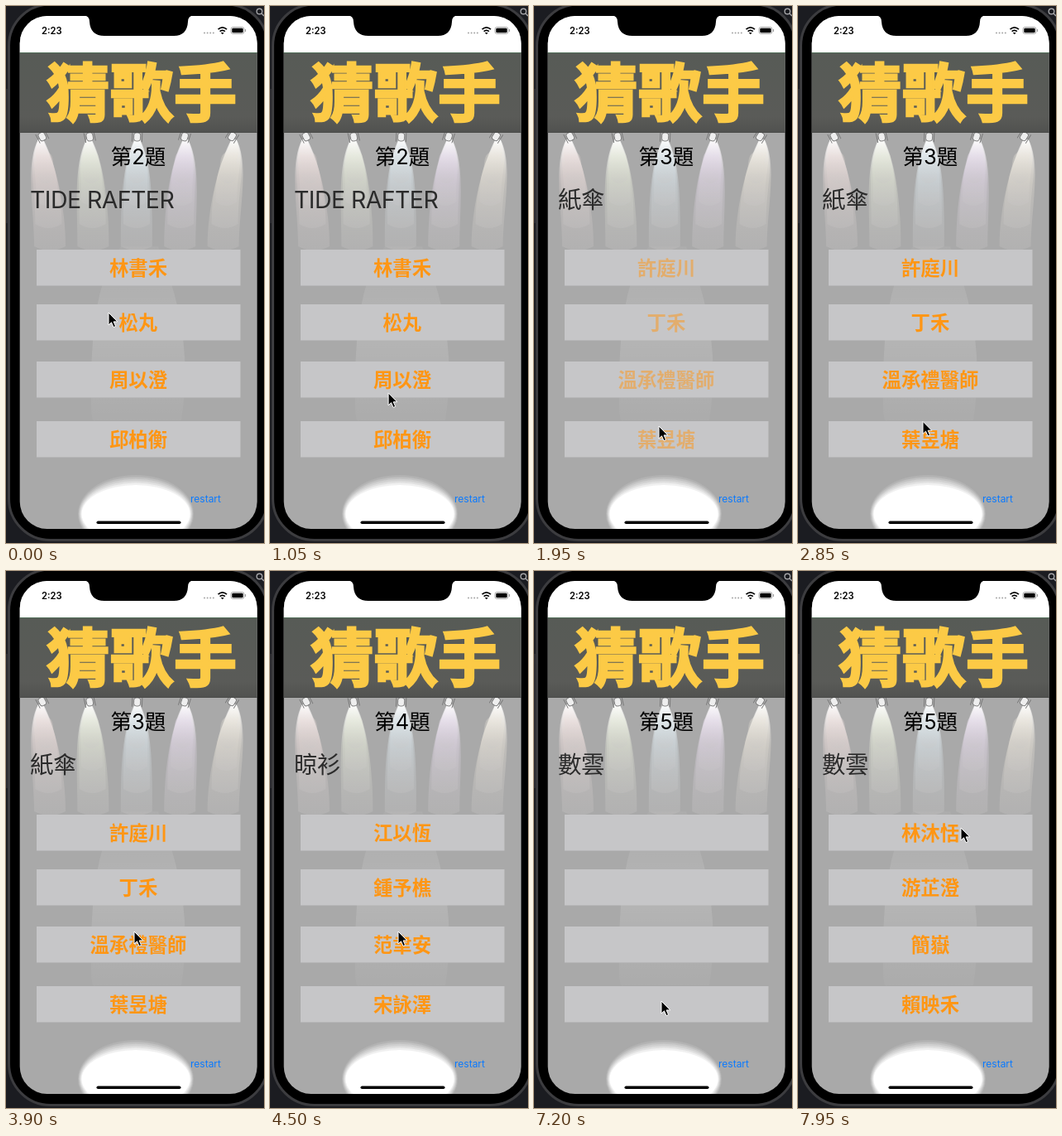
Write an HTML page that moves like this. It is 312 by 648 pixels and loops after 8 s.

```html
<!DOCTYPE html>
<html lang="zh-Hant">
<head>
<meta charset="utf-8">
<title>猜歌手</title>
<style>
  html, body { margin: 0; height: 100%; overflow: hidden; background: #1b1c21; }
  svg { display: block; width: 312px; height: 648px; }
  text { font-family: Inter, "Noto Sans CJK TC", "Noto Sans CJK SC", "Noto Sans CJK JP", sans-serif; }
  .banner { font-size: 76px; font-weight: 900; letter-spacing: 1px; fill: #fcca46; stroke: #fcca46; stroke-width: 2.6; }
  .number { font-size: 25.5px; }
  .song { font-size: 28.5px; letter-spacing: -.02em; fill: #2b2b2b; }
  .option { font-size: 23.4px; font-weight: 600; fill: #ff9614; }
  .restart { font-size: 12px; fill: #0a7aff; }
  .clock { font-size: 11.2px; font-weight: 600; }
  .mid { text-anchor: middle; }
</style>
</head>
<body>
<svg viewBox="0 0 312 648">
  <defs>
    <clipPath id="screen"><rect x="16.7" y="12" width="287" height="619" rx="33"/></clipPath>
    <linearGradient id="header" x2="0" y2="1">
      <stop stop-color="#575b56"/><stop offset=".8" stop-color="#5a5b58"/><stop offset="1" stop-color="#50514f"/>
    </linearGradient>
    <linearGradient id="pool" x2="0" y2="1">
      <stop stop-color="#fff" stop-opacity=".04"/><stop offset=".5" stop-color="#fff" stop-opacity=".14"/>
      <stop offset="1" stop-color="#fff" stop-opacity=".03"/>
    </linearGradient>
  </defs>

  <!-- desktop and phone body -->
  <path d="M0 100h3v162H0z" fill="#2b2b30"/>
  <g fill="none" stroke="#a5a5a8" stroke-width="1.4"><circle cx="306.5" cy="6.5" r="3.3"/><path d="M309 9l3 3"/></g>
  <rect x="3.5" y="-2" width="313" height="646.5" rx="50" stroke="#3c3c3f" stroke-width="3"/>

  <g clip-path="url(#screen)">
    <rect x="16" y="12" width="289" height="620" fill="#a9a9a9"/>
    <path d="M139 290Q108 330 104 420T108 500H212Q220 450 214 400T184 290Z" fill="url(#pool)"/>
    <g id="lamps"></g>
    <g id="floor"></g>
    <rect x="16" y="12" width="289" height="44" fill="#fff"/>
    <rect x="16" y="56" width="289" height="97" fill="url(#header)"/>
    <path d="M16 56.5H305" stroke="#53705a"/>
    <path d="M16 152.5H305" stroke="#4a4b49"/>
  </g>
  <path d="M94 11Q101 12 101 19Q102 36 119 36H203Q219 36 220 19Q220 12 227 11Z"/>

  <!-- status bar -->
  <text class="clock" x="43" y="34">2:23</text>
  <path d="M240 32.5H252" stroke="#a6a6a6" stroke-width="2" stroke-linecap="round" stroke-dasharray="0 3.6"/>
  <g fill="none" stroke="#000" stroke-width="1.7">
    <path d="M256.5 28.2Q261.7 23.6 267 28.2M258.6 30.7Q261.7 28 264.9 30.7"/>
    <path d="M260.4 32.5h2.7l-1.3 1.2z" stroke-width="1"/>
  </g>
  <rect x="272" y="25.5" width="16" height="8" rx="2.4" fill="none" stroke="#999" stroke-width=".8"/>
  <rect x="273.3" y="26.8" width="13.4" height="5.4" rx="1.2"/>
  <path d="M289.6 28v3" stroke="#999"/>

  <text class="banner mid" x="164.5" y="133">猜歌手</text>
  <text class="number mid" id="number" x="160" y="191"></text>
  <text class="song" id="song" x="29" y="244"></text>
  <g id="options"></g>
  <text class="restart" x="223" y="599">restart</text>
  <rect x="109.5" y="621.4" width="102" height="3.6" rx="1.8"/>
  <path id="cursor" d="M0 0V15L3.5 11.8L6 17.6L8.6 16.5L6.1 10.9H10.8Z" stroke="#fff" stroke-width="1" stroke-linejoin="round"/>
</svg>
<script>
const LOOP = 8000, STEP = 150;
const $ = id => document.getElementById(id);
const clamp = v => Math.max(0, Math.min(1, v));
const repeat = (count, make) => Array.from({ length: count }, (_, i) => make(i)).join("");

const quiz = [
  ["TIDE RAFTER", "林書禾", "松丸", "周以澄", "邱柏衡"],
  ["紙傘", "許庭川", "丁禾", "溫承禮醫師", "葉昱塘"],
  ["晾衫", "江以恆", "鍾予樵", "范聿安", "宋詠澤"],
  ["數雲", "林沐恬", "游芷澄", "簡嶽", "賴映禾"]
];

// Each answer brings up the next question; its options fade in after the press.
const answers = [
  { time: 1650, pressed: 3, fade: 300 },
  { time: 4200, pressed: 2, fade: 150 },
  { time: 7050, pressed: 3, fade: 300 }
];

const home = { x: 124, y: 370 };
const moves = [
  { from: 750, to: 1350, x: 151, y: 507 },
  { from: 2700, to: 3000, x: 151, y: 499 },
  { from: 3000, to: 3300, x: 154, y: 525 },
  { from: 3450, to: 3900, x: 155, y: 435 },
  { from: 6150, to: 6450, x: 152, y: 490 },
  { from: 6600, to: 6900, x: 154, y: 519 },
  { from: 7650, to: 7950, x: 197, y: 310 }
];

function pointerAt(t) {
  return moves.reduce((p, m) => {
    const k = Math.sin(clamp((t - m.from) / (m.to - m.from)) * Math.PI / 2);
    return { x: p.x + (m.x - p.x) * k, y: p.y + (m.y - p.y) * k };
  }, home);
}

function lamp(i) {
  const x = 42 + 58.4 * i, drift = 11 - 6 * i;
  const tint = `hsl(${[8, 75, 200, 280, 40][i]} 28% 88%)`;
  const layers = repeat(4, n => {
    const half = 19 - 3 * n, bottom = 290 - 27 * n, end = x + drift * (1 - n * .15);
    return `<path d="M${x - 3} 161C${x - half} 190 ${end - half} ${bottom - 45} ${end - half} ${bottom}` +
      `Q${end} ${bottom + 10} ${end + half} ${bottom}C${end + half} ${bottom - 45} ${x + half} 190 ${x + 3} 161Z" fill="url(#beam${i})"/>`;
  });
  return `<linearGradient id="beam${i}" x2="0" y2="1">
      <stop stop-color="#fff" stop-opacity=".6"/><stop offset=".4" stop-color="${tint}" stop-opacity=".32"/>
      <stop offset="1" stop-color="#c8c6c6" stop-opacity=".28"/>
    </linearGradient>${layers}
    <g transform="rotate(${-drift * 2.5} ${x} 154)" fill="none" stroke="#777" stroke-width=".9">
      <path d="M${x - 6} 152V164M${x + 6} 152V164"/>
      <rect x="${x - 4}" y="153" width="8" height="10" rx="3" fill="#eee"/>
    </g>`;
}

$("lamps").innerHTML = repeat(5, lamp);

$("floor").innerHTML = repeat(6, i =>
  `<ellipse cx="157" cy="613" rx="${70 - i * .9}" ry="${47 - i * 2.4}" fill="hsl(0 0% ${70 + i * 6}%)"/>`);

$("options").innerHTML = [294, 360, 429, 501].map(y =>
  `<rect x="37" y="${y}" width="246.5" height="43.5" fill="#c6c6c8"/>` +
  `<text class="option mid" x="160" y="${y + 30.7}"></text>`
).join("");
const labels = document.querySelectorAll(".option");

function draw(now) {
  const t = Math.floor(now % LOOP / STEP) * STEP;
  const given = answers.filter(a => a.time <= t);
  const question = given.length;
  const last = given.at(-1) ?? { time: -LOOP, fade: STEP };
  const shown = t - last.time - STEP;
  const pressing = shown < 0;
  const set = pressing ? question - 1 : question;

  $("number").textContent = `第${question + 2}題`;
  $("song").textContent = quiz[question][0];
  labels.forEach((label, i) => {
    label.textContent = quiz[set][i + 1];
    label.setAttribute("opacity", !pressing ? clamp(shown / last.fade) : i === last.pressed ? .2 : 1);
  });
  const { x, y } = pointerAt(t);
  $("cursor").setAttribute("transform", `translate(${x} ${y})`);
}

const start = performance.now();
function tick() {
  draw(performance.now() - start);
  requestAnimationFrame(tick);
}
tick();
</script>
</body>
</html>
```
